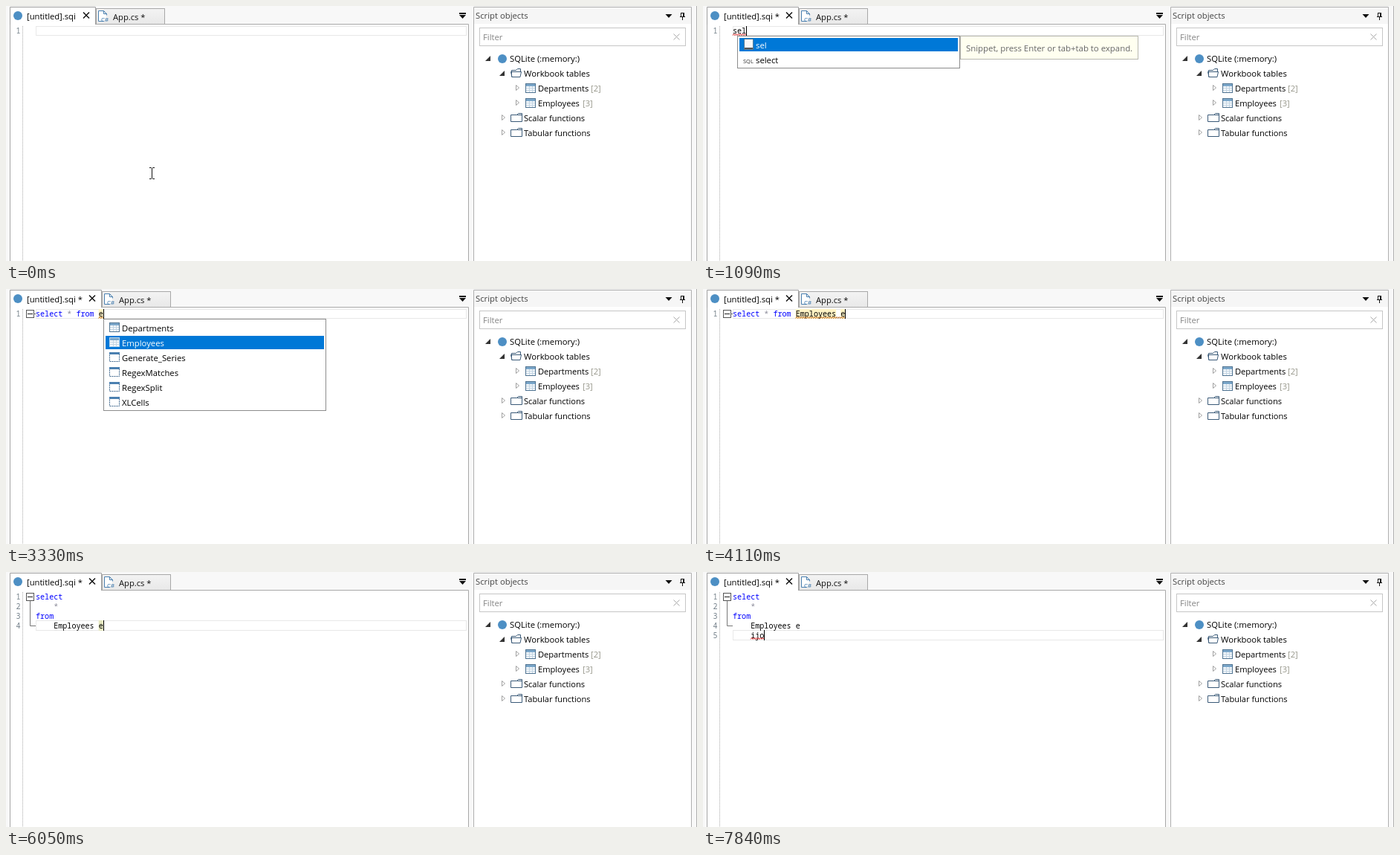
An HTML page for the animation above (8000 ms loop, 930 by 343 pixels).

```html
<!DOCTYPE html>
<html lang="en">
<head>
<meta charset="utf-8">
<title>Query editor</title>
<style>
  html, body { margin: 0; width: 100%; height: 100%; overflow: hidden; background: #f8f8f8; }
  svg { display: block; }
  text { font: 11.3px "Open Sans", "Noto Sans", sans-serif; fill: #000; white-space: pre; }
  .code text { font: 10.08px "Noto Sans Mono", "DejaVu Sans Mono", monospace; }
</style>
</head>
<body>
<svg width="930" height="343" viewBox="0 0 930 343">
  <linearGradient id="shade" x2="0" y2="1">
    <stop stop-color="#f3f3f3"/><stop offset="1" stop-color="#e8e8e8"/>
  </linearGradient>
  <g id="base"></g>
  <g id="live"></g>
</svg>
<script>
const LOOP = 8000, CHAR = 6.05, LINE = 12.88, LEFT = 40, TOP = 27;
const BLUE = '#0078d7', RED = '#e03030', BROWN = '#b5651d';

// Drawing helpers
const rect = (x, y, w, h, fill, extra = '') =>
  `<rect x="${x}" y="${y}" width="${w}" height="${h}" fill="${fill}" ${extra}/>`;
const box = (x, y, w, h, fill, stroke, extra = '') =>
  rect(x + .5, y + .5, w - 1, h - 1, fill, `stroke="${stroke}" ${extra}`);
const path = (d, stroke, fill = 'none', extra = '') =>
  `<path d="${d}" stroke="${stroke}" fill="${fill}" ${extra}/>`;
const text = (x, y, s, fill = '#000', size = 11.3) =>
  `<text x="${x}" y="${y}" style="fill:${fill};font-size:${size}px">${s}</text>`;
const dot = (x, y) => `<circle cx="${x}" cy="${y}" r="6" fill="#4d8fc4"/>`;

function cross(x, y, r, color, width) {
  return path(`M${x - r} ${y - r}L${x + r} ${y + r}M${x + r} ${y - r}L${x - r} ${y + r}`,
    color, 'none', `stroke-width="${width}"`);
}

function tableIcon(x, y, border = '#4f7391') {
  return box(x, y, 14, 13, '#f4f8fb', border) +
    rect(x + 1, y + 1, 12, 3, '#7ba7ca') +
    path(`M${x + 1} ${y + 6.5}h12M${x + 1} ${y + 9.5}h12M${x + 5.5} ${y + 4}v8M${x + 9.5} ${y + 4}v8`,
      '#c3d5e3');
}

function functionIcon(x, y) {
  return box(x, y, 14, 13, '#fff', '#3f678c', 'stroke-dasharray="2 1"') +
    rect(x, y, 14, 3, '#4b80b0');
}

function snippetIcon(x, y) {
  return box(x, y, 13, 15, '#eaf3fb', '#444', 'stroke-dasharray="1 1"') +
    rect(x + 2, y + 2, 9, 9, '#f8f8f8') + rect(x + 1, y + 12, 11, 2, '#555');
}

function folder(x, y, open) {
  return open
    ? path(`M${x + 1.5} ${y + 11.5}v-9h6l2 -2h4v4M${x + .5} ${y + 4.5}h14l-1.5 7h-11z`, '#3a5a78', '#fff')
    : path(`M${x + .5} ${y + 11.5}v-9h8l2 -2h5v11zM${x + 8.5} ${y + 2.5}h7`, '#3a5a78', '#fff');
}

function twisty(x, y, open) {
  return open
    ? path(`M${x + 7} ${y - 4}v7h-7z`, 'none', '#333')
    : path(`M${x + 1.5} ${y - 3.5}l4 3.5l-4 3.5z`, '#a0a0a0', '#fff');
}

function base() {
  const editor = rect(5, 24, 618, 320, '#fff') +
    path('M5.5 343V24.5H622.5V343', '#a8a8a8') +
    path('M22.5 27V343', '#aaa', 'none', 'stroke-dasharray="1 1"') +
    rect(610, 9, 9, 2, '#111') + path('M610 12h9l-4.5 5z', 'none', '#111');

  const panel = rect(629, 1, 294, 342, '#fff') + rect(630, 2, 292, 22, '#f6f6f6') +
    path('M629.5 343V1.5H922.5V343M929.5 0V343', '#b0b0b0') +
    text(632, 17, 'Script objects', '#444') +
    path('M887.5 11h9l-4.5 5z', 'none', '#111') +
    path('M908.5 9v5M908 9.5h4.5M907 14.5h7M910.5 15v4', '#111') + rect(911, 9, 2, 5, '#111') +
    box(637, 29, 278, 25, '#fff', '#c6c6c6') + text(642, 46, 'Filter', '#858585') +
    cross(902.5, 41.5, 4, '#aaa', 1);

  const tree = twisty(645, 71, true) + dot(668, 71) + text(678, 75, 'SQLite (:memory:)') +
    twisty(664, 91, true) + folder(679, 84, true) + text(697, 95, 'Workbook tables') +
    [['Departments', 2, 787], ['Employees', 3, 776]].map(([name, count, x], i) => {
      const y = 110 + 20 * i;
      return twisty(685, y, false) + tableIcon(699, y - 6) +
        text(716, y + 5, name, '#000', 11.1) + text(x, y + 5, `[${count}]`, '#96968a', 11.1);
    }).join('') +
    ['Scalar functions', 'Tabular functions'].map((name, i) => {
      const y = 150 + 20 * i;
      return twisty(666, y, false) + folder(679, y - 6, false) + text(697, y + 5, name, '#000', 11.1);
    }).join('');

  return editor + panel + tree;
}

function tabs(edited) {
  const end = edited ? 128 : 120;
  return path(`M5.5 25V1.5H${end + .5}V25`, '#a0a0a0', '#fff') + dot(16, 13) +
    text(28, 18, '[untitled].sqi' + (edited ? ' *' : ''), '#000', 11.2) +
    cross(end - 12, 12.5, 4, '#111', 1.5) +
    box(end + 1, 3, 93, 22, 'url(#shade)', '#a8a8a8') +
    path(`M${end + 11.5} 20.5h-7v-14h7l4 4v2M${end + 11.5} 6.5v4h4`, '#4a80b0', '#fff') +
    text(end + 8, 21, 'C#', '#2f6fa8', 8) +
    text(end + 24, 19, 'App.cs *', '#111', 11.2);
}

const colX = col => LEFT + col * CHAR;
const baseline = row => Math.round(37 + row * LINE);

function codeLine(s, row, selected) {
  return [...s.matchAll(/\S+/g)].map(({ 0: word, index }) => {
    const fill = selected && word === 'source' ? '#fff'
      : /^(select|from)$/.test(word) ? '#0000ff' : word === '*' ? '#8a8a98' : '#000';
    return `<text x="${colX(index)}" y="${baseline(row)}" style="fill:${fill}">${word}</text>`;
  }).join('');
}

function squiggle([col, count, color], row) {
  const x = colX(col), y = Math.floor(TOP + row * LINE) + 12.5;
  return path(`M${x} ${y}` + 'l1.5 -2l1.5 2'.repeat(Math.round(count * CHAR / 3)), color);
}

function popup({ x, y, items, pick, opacity = 1 }) {
  const rows = items.map(([kind, name], i) => {
    const top = y + 3 + i * 20, on = i === pick;
    const icon = {
      snippet: () => snippetIcon(x + 9, top + 1),
      sql: () => text(x + 8, top + 14, 'SQL', on ? '#fff' : '#333', 7.5),
      table: () => tableIcon(x + 8, top + 2, on ? '#b9d4ec' : undefined),
      func: () => functionIcon(x + 8, top + 2)
    }[kind]();
    return (on ? rect(x + 3, top, 294, 18, BLUE) : '') + icon +
      text(x + 25, top + 14, name, on ? '#fff' : '#000');
  });
  return `<g opacity="${opacity}">` +
    box(x, y, 300, items.length * 20 + 4, '#fff', '#8c8c8c') + rows.join('') + '</g>';
}

const tooltip = (x, y) => box(x, y, 240, 32, '#fffff0', '#b8b8b0') +
  text(x + 8, y + 21, 'Snippet, press Enter or tab+tab to expand.', '#666', 11.4);

const mouse = () => path('M193 217.5h2.5l1 1l1 -1h2.5M196.5 218V232M193 232.5h2.5l1 -1l1 1h2.5', '#111');

function foldMark(last) {
  return box(27, 28, 11, 11, '#fff', '#555') + path('M29 33.5h7', '#222') +
    (last ? path(`M32.5 39V${Math.floor(34 + last * LINE) + .5}H40`, '#777') : path('M38 33.5h2', '#777'));
}

function draw(s) {
  const last = s.lines.length - 1;
  const top = Math.floor(TOP + last * LINE);
  const height = Math.ceil(TOP + (last + 1) * LINE) - top;
  const numbers = s.lines.map((_, i) =>
    `<text x="13.5" y="${baseline(i)}" style="fill:#74808a">${i + 1}</text>`).join('');
  const caretX = Math.round(colX(s.lines[last].length));
  return tabs(s.edited) +
    box(LEFT, top, 580, height, 'none', '#e8e8e8') +
    (s.marks || []).map(([col, n]) =>
      rect(colX(col), top, n * CHAR, height, s.tint || '#fff3c4')).join('') +
    (s.selected ? box(124, 27, 38, 13, '#3489d4', '#1d6fba', 'rx="1"') : '') +
    '<g class="code">' + numbers +
    s.lines.map((line, i) => codeLine(line, i, s.selected)).join('') + '</g>' +
    (s.fold === undefined ? '' : foldMark(s.fold)) +
    (s.errors || []).map(e => squiggle(e, last)).join('') +
    (s.caret ? rect(caretX, top, 1, height, '#000') : '') +
    (s.popup ? popup(s.popup) : '') +
    (s.tip ? tooltip(...s.tip) : '') +
    (s.mouse ? mouse() : '');
}

// Timeline: each step changes only what it names
const selList = { x: 46, y: 40, items: [['snippet', 'sel'], ['sql', 'select']], pick: 0 };
const tables = [['table', 'Departments'], ['table', 'Employees'], ['func', 'Generate_Series'],
  ['func', 'RegexMatches'], ['func', 'RegexSplit'], ['func', 'XLCells']];
const tableList = { x: 131, y: 40, items: tables };
const oneTable = { x: 131, y: 40, items: [tables[1]], pick: 0 };
const joinList = { x: 70, y: 91, items: [['snippet', 'ij'], ['snippet', 'ijo']], pick: 0 };
const query = 'select * from ';
const block = ['select', '    *', 'from', '    Employees e'];
const typed = s => [...block, '    ' + s];

const steps = [
  [0, { lines: [''], mouse: true }],
  [460, { lines: ['s'], edited: true, mouse: false, caret: true }],
  [550, { popup: selList }],
  [640, { errors: [[0, 1, RED]] }],
  [730, { lines: ['se'] }],
  [820, { errors: [[0, 2, RED]] }],
  [910, { lines: ['sel'] }],
  [1000, { tip: [346, 40] }],
  [1090, { errors: [[0, 3, RED]] }],
  [1390, { tip: null }],
  [1470, { popup: { ...selList, opacity: .5 } }],
  [1550, { popup: null }],
  [1930, { lines: [query + 'source'], errors: null }],
  [2090, { fold: 0 }],
  [2240, { selected: true }],
  [2700, { caret: false }],
  [3020, { lines: [query + 'e'], selected: false, caret: true }],
  [3120, { popup: tableList }],
  [3330, { popup: { ...tableList, pick: 1 }, marks: [[14, 1]], errors: [[14, 1, BROWN]] }],
  [3410, { lines: [query + 'em'] }],
  [3560, { popup: oneTable }],
  [3720, { lines: [query + 'emp'] }],
  [3880, { marks: [[14, 3]], errors: [[14, 3, BROWN]] }],
  [4110, { lines: [query + 'Employees e'], popup: null,
    marks: [[14, 9], [24, 1]], errors: [[14, 11, BROWN]] }],
  [4260, { errors: null }],
  [4500, { marks: [[24, 1]], tint: '#e6e8c0' }],
  [4720, { caret: false }],
  [5200, { lines: block, caret: true, marks: null }],
  [5350, { fold: 3 }],
  [5500, { marks: [[14, 1]] }],
  [5900, { caret: false }],
  [6050, { caret: true }],
  [6370, { lines: typed(''), marks: null }],
  [6920, { lines: typed('i') }],
  [7030, { popup: joinList }],
  [7140, { errors: [[4, 1, RED]] }],
  [7260, { lines: typed('ij'), tip: [370, 91] }],
  [7380, { errors: [[4, 2, RED]] }],
  [7500, { lines: typed('ijo'), popup: { ...joinList, items: [joinList.items[1]] } }],
  [7620, { errors: [[4, 3, RED]] }],
  [7730, { tip: null }],
  [7840, { popup: null }]
];
let state = {};
const states = steps.map(([at, change]) => ({ at, ...(state = { ...state, ...change }) }));

document.getElementById('base').innerHTML = base();
const live = document.getElementById('live');
const start = performance.now();
let shown;

function tick() {
  const t = (performance.now() - start) % LOOP;
  const now = states.findLast(s => s.at <= t) || states[0];
  if (now !== shown) live.innerHTML = draw(shown = now);
  requestAnimationFrame(tick);
}
tick();
</script>
</body>
</html>
```
